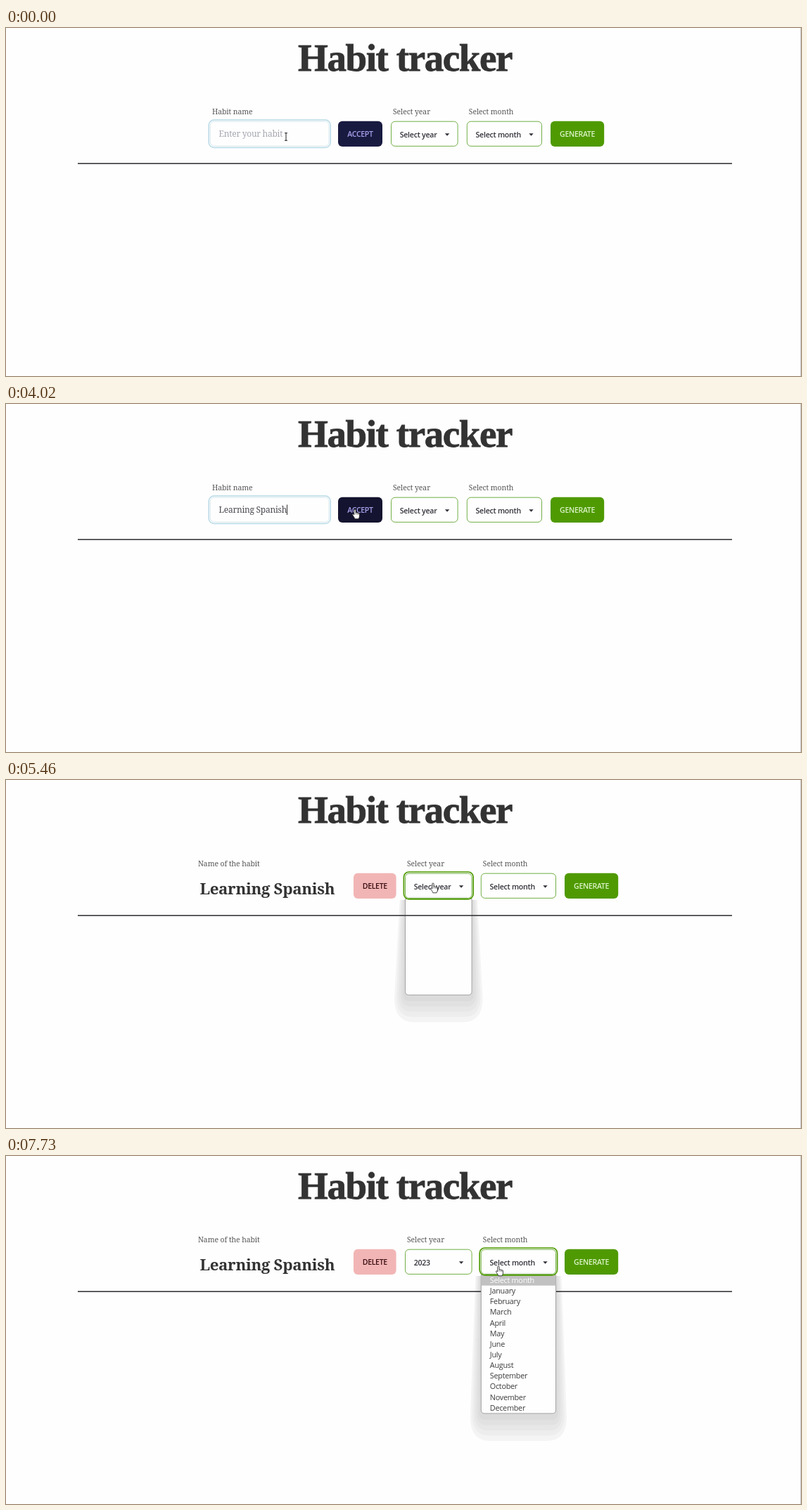
An HTML page for the animation above (8000 ms loop, 1130 by 496 pixels).

```html
<!DOCTYPE html>
<html lang="en">
<head>
<meta charset="utf-8">
<title>Habit tracker</title>
<style>
html, body { margin: 0; width: 100%; height: 100%; overflow: hidden; background: #fefefe; }
svg { display: block; width: 100vw; height: 100vh; }
text { white-space: pre; }
.title { font: 700 55px "Liberation Serif", serif; letter-spacing: -1.4px; fill: #333; stroke: #333; stroke-width: .8px; }
.label { font: 400 10.4px "Noto Serif", serif; letter-spacing: -.06px; fill: #555; }
.field { font: 400 12px "Noto Serif", serif; letter-spacing: -.25px; fill: #4a4a52; }
.hint { fill: #a5a7b0; }
.habit { font: 700 22.3px "Noto Serif", serif; letter-spacing: -.35px; fill: #333; }
.select { font: 600 10.6px "Open Sans", sans-serif; letter-spacing: -.25px; fill: #303038; }
.option { font: 400 10.8px "Open Sans", sans-serif; letter-spacing: -.25px; fill: #3c3c3c; }
.button { font: 600 10.6px "Open Sans", sans-serif; letter-spacing: -.35px; text-anchor: middle; }
</style>
</head>
<body>
<svg id="stage" viewBox="0 0 1130 496" preserveAspectRatio="none"></svg>
<script>
const LOOP = 8000;
const HABIT = 'Learning Spanish';
const KEY_TIMES = [150, 450, 570, 750, 1180, 1330, 1480, 1590, 1690, 2030, 2190, 2290, 2390, 2490, 2670, 2790];
const PRESS = 4290, ACCEPTED = 4440;
const YEAR_OPEN = 5460, YEAR_FILLED = 5490, YEAR_DONE = 6760, MONTH_OPEN = 7730;
const GREEN = '#4f9a02';
const NAVY = [25, 26, 64], NAVY_HOVER = [20, 20, 48], PINK = [242, 181, 181];
const MONTHS = ['Select month', 'January', 'February', 'March', 'April', 'May', 'June', 'July',
  'August', 'September', 'October', 'November', 'December'];
const YEARS = ['Select year', ...Array.from({ length: 8 }, (_, i) => String(2022 + i))];
const POPUP_TOP = 169.5, ROW = 15.15;

const smooth = p => p * p * (3 - 2 * p);
const easeOut = p => 1 - (1 - p) ** 2;
const linear = p => p;
const clamp = p => Math.max(0, Math.min(1, p));
const mix = (a, b, p) => a + (b - a) * p;
const mixColor = (a, b, p) => `rgb(${a.map((v, i) => Math.round(mix(v, b[i], p)))})`;

// time, x, y, easing of the stretch that ends here
const PATH = [
  [0, 398, 155, linear], [3760, 398, 155, linear], [4020, 496, 150, smooth],
  [4800, 496, 150, linear], [4890, 530, 153, linear], [5250, 607, 147, easeOut],
  [5750, 607, 147, linear], [6340, 614.5, 206.5, smooth],
  [6920, 614.5, 206.5, linear], [7480, 700, 157, smooth], [LOOP, 700, 157, linear]
];

function pointer(t) {
  const i = Math.max(1, PATH.findIndex(k => k[0] >= t));
  const [t0, x0, y0] = PATH[i - 1], [t1, x1, y1, ease] = PATH[i];
  const p = ease(clamp((t - t0) / (t1 - t0)));
  return { x: mix(x0, x1, p), y: mix(y0, y1, p) };
}

const text = (cls, x, y, str, extra = '') => `<text class="${cls}" x="${x}" y="${y}" ${extra}>${str}</text>`;
const box = (x, y, w, h, r, attrs) => `<rect x="${x}" y="${y}" width="${w}" height="${h}" rx="${r}" ${attrs}/>`;

function button(x, w, str, fill, color, scale = 1) {
  const cx = x + w / 2;
  return `<g transform="translate(${cx} 151) scale(${scale}) translate(${-cx} -151)">` +
    box(x, 132.8, w, 36.2, 6, `fill="${fill}"`) +
    text('button', cx, 155, str, `fill="${color}"`) + '</g>';
}

function select(x, w, label, value, focused, open) {
  const ax = x + w - 15.5;
  return text('label', x + 3, 122.5, label) +
    (focused ? box(x - 1.6, 131, w + 3.2, 38.8, 7.5, `fill="#fefefe" stroke="${GREEN}" stroke-width="1.7"`) : '') +
    box(x + .5, 133.2, w - 1, 35.2, 5.5, 'fill="#fefefe" stroke="#72af45"') +
    (open ? box(x + 6, 165.5, w - 12, 3, 1.5, 'opacity=".035"') : '') +
    text('select', x + 12.7, 155.7, value) +
    `<path d="M${ax - 3.2} 150.3h6.4l-3.2 3.4z" fill="#303038"/>`;
}

function shadow(x, w, bottom) {
  let out = '';
  for (let i = 0; i < 5; i++) {
    const side = 15 - 3 * i, top = side * .5, low = bottom + 39 - 7.5 * i, r = 28 - 5 * i;
    const l = x - side, rt = x + w + side;
    out += `<path d="M${x - top} 171L${l} ${low - r - 6}Q${l} ${low} ${l + r} ${low}` +
      `H${rt - r}Q${rt} ${low} ${rt} ${low - r - 6}L${x + w + top} 171z" opacity="${i ? .028 : .04}"/>`;
  }
  return out;
}

function popup(x, w, options, active, filled) {
  const bottom = POPUP_TOP + options.length * ROW + .5;
  let out = shadow(x, w, bottom) +
    `<path d="M${x + .5} ${POPUP_TOP}H${x + w - .5}V${bottom - 5}q0 5-5 5H${x + 5.5}q-5 0-5-5z" fill="#fefefe" stroke="#a2a2a2"/>`;
  if (!filled) return out;
  options.forEach((name, i) => {
    const y = POPUP_TOP + i * ROW, on = i === active;
    if (on) out += box(x + .5, y, w - 1, ROW, 0, `fill="${i ? '#1967d2' : '#c1c1c1'}"`);
    const fill = on ? '#fff' : i ? '#3c3c3c' : '#9a9a9a';
    out += text('option', x + 13, y + 11.4, name, `style="fill:${fill}"`);
  });
  return out;
}

function cursor({ x, y }, t) {
  const accepted = t >= ACCEPTED, within = (a, b) => x >= a && x <= b;
  const inRow = y < 169;
  const hand = inRow && (accepted
    ? within(494, 554.5) || within(567, 662.5) || within(674.5, 782)
    : within(472, 535));
  let shape;
  if (!accepted && inRow && within(288, 461)) {
    shape = '<path d="M-2-5.3H2M-2 5.3H2M0-5.3V5.3" fill="none" stroke="#222" stroke-width="1"/>';
  } else if (hand) {
    shape = '<path d="M-1.2.9a1.2 1.2 0 0 1 2.3 0V5c.5-.6 1.8-.4 2 .3.5-.5 1.6-.3 1.8.5.6-.4 1.5 0 1.5 1V10' +
      'c0 2-1.1 2.4-1.3 3.8H-.2C-.5 12-2.6 9.6-3.4 8c-.4-1 .6-1.6 1.4-.9l.8.9z" fill="#fff" stroke="#222" stroke-width=".85"/>' +
      '<path d="M1.1 5v2.5M3.1 5.5v2.2M4.9 6v2" stroke="#222" stroke-width=".6"/>';
  } else {
    shape = '<path d="M0 0V9.6L2.2 7.5 3.8 11.2 5.3 10.5 3.8 7H6.7z" fill="#fff" stroke="#333" stroke-width=".85"/>';
  }
  return `<g transform="translate(${x.toFixed(1)} ${y.toFixed(1)})">${shape}</g>`;
}

function entryForm(t, mouse) {
  const count = KEY_TIMES.filter(k => k <= t).length;
  const typed = HABIT.slice(0, count).replace(/ /g, '\u00a0');
  const lastKey = KEY_TIMES[count - 1];
  const caretOn = t >= 190 && t < PRESS && Math.floor((t - lastKey) / 515) % 2 === 0;
  const hover = clamp((mouse.x - 472) / 15);
  const scale = t >= PRESS ? mix(1, .96, clamp((t - PRESS) / 60)) : 1;
  return text('label', 293, 122.5, 'Habit name') +
    box(288.2, 131.1, 173, 39.3, 7.5, 'fill="none" stroke="#b8dae6" stroke-width="1.5"') +
    box(290.3, 133.2, 168.8, 35.1, 5.5, 'fill="none" stroke="#d3e5eb" stroke-width=".9"') +
    (count ? text('field', 302.6, 155.2, typed, 'id="typed"') : text('field hint', 302.6, 155.2, 'Enter your habit')) +
    (caretOn ? box(302.6, 143.5, 1, 14.5, 0, 'id="caret" fill="#333"') : '') +
    button(472, 63, 'ACCEPT', mixColor(NAVY, NAVY_HOVER, hover), '#a9a2ee', scale);
}

function namedHabit(t) {
  const p = clamp((t - ACCEPTED) / 210);
  const pop = p < .4 ? mix(.96, 1.02, p / .4) : mix(1.02, 1, (p - .4) / .6);
  return text('label', 273, 122.5, 'Name of the habit') +
    text('habit', 275.5, 163, HABIT) +
    button(494, 60.6, 'DELETE', mixColor(NAVY, PINK, smooth(p)), mixColor([169, 162, 238], [58, 14, 18], smooth(p)), pop);
}

function scene(t) {
  const mouse = pointer(t), accepted = t >= ACCEPTED, dx = accepted ? 20 : 0;
  const yearOpen = t >= YEAR_OPEN && t < YEAR_DONE, monthOpen = t >= MONTH_OPEN;
  const yearX = 547 + dx, monthX = 654.8 + dx;
  const row = Math.max(0, Math.floor((mouse.y - POPUP_TOP) / ROW));
  const divider = box(102, 192.4, 930, 1.6, 0, 'fill="#38383c"');
  const lists = (yearOpen ? popup(yearX, 95.6, YEARS, row, t >= YEAR_FILLED) : '') +
    (monthOpen ? popup(monthX, 107.2, MONTHS, 0, true) : '');
  // the page line shows through the list until its rows appear
  const blank = yearOpen && t < YEAR_FILLED;
  return box(0, 0, 1130, 496, 0, 'fill="#fefefe"') +
    box(1129, 0, 1, 496, 0, 'fill="#cacaca"') +
    text('title', 415, 61, 'Habit tracker') +
    (blank ? lists + divider : divider + lists) +
    (accepted ? namedHabit(t) : entryForm(t, mouse)) +
    select(yearX, 95.6, 'Select year', t >= YEAR_DONE ? '2023' : 'Select year', t >= YEAR_OPEN && !monthOpen, yearOpen) +
    select(monthX, 107.2, 'Select month', 'Select month', monthOpen, monthOpen) +
    button(774 + dx, 76.2, 'GENERATE', GREEN, '#dcf3c8') +
    cursor(mouse, t);
}

const stage = document.getElementById('stage');
let shown = '';

function draw(t) {
  const next = scene(t);
  if (next === shown) return;
  stage.innerHTML = shown = next;
  const caret = document.getElementById('caret'), typed = document.getElementById('typed');
  if (caret && typed) caret.setAttribute('x', Math.round(302.6 + typed.getComputedTextLength()));
}

const start = performance.now();
function tick() {
  draw((performance.now() - start) % LOOP);
  requestAnimationFrame(tick);
}
tick();
</script>
</body>
</html>
```
